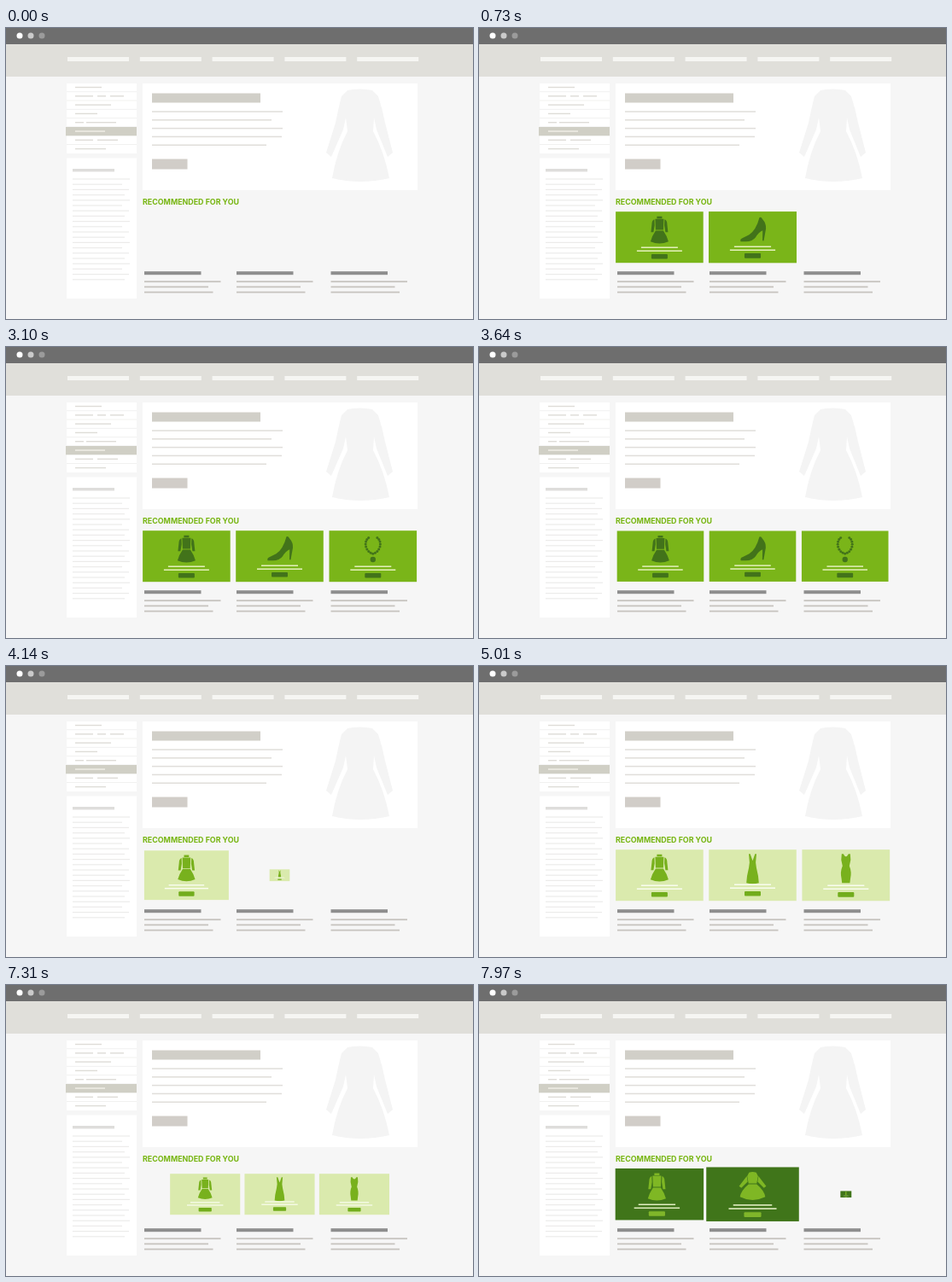
Animation, 547 px wide and 341 px high, one loop 8000 ms. Source, as an HTML page:

```html
<!DOCTYPE html>
<html lang="en">
<head>
<meta charset="utf-8">
<title>Recommendations</title>
<style>
  html, body { margin: 0; width: 100%; height: 100%; overflow: hidden; background: #f6f6f6; }
  svg { display: block; width: 100%; height: 100%; }
</style>
</head>
<body>
<svg id="stage" viewBox="0 0 547 341">
  <g id="page"></g>
  <text x="160" y="206.6" font-family="Inter, sans-serif" font-weight="700" font-size="8.9" fill="#76b510">RECOMMENDED FOR YOU</text>
  <g id="cards"></g>
</svg>
<script>
const LOOP = 8000;
const CENTERS = [211.4, 320.5, 429.8], MIDDLE_Y = 245.2;

const rect = (x, y, w, h, fill) => `<rect x="${x}" y="${y}" width="${w}" height="${h}" fill="${fill}"/>`;
const rule = (x1, x2, y, fill, h = 1.4) => rect(x1, y - h / 2, x2 - x1, h, fill);
const dot = (x, fill) => `<circle cx="${x}" cy="9" r="3.5" fill="${fill}"/>`;

function drawPage() {
  const out = [
    rect(0, 0, 547, 341, '#f6f6f6'), rect(0, 0, 547, 19, '#6e6e6e'), rect(0, 19, 547, 38, '#e0dfda'),
    dot(16, '#fff'), dot(29, '#cacaca'), dot(42, '#9b9b9b'),
    rect(71, 65, 82, 82, '#fff'), rect(71, 152.5, 82, 164.5, '#fff'), rect(160, 65, 322, 125, '#fff')
  ];
  for (let i = 0; i < 5; i++) out.push(rect(72 + i * 84.8, 34, 72, 5, '#f6f6f3'));

  // side menu
  const menu = [[[81, 112]], [[81, 102], [107, 117], [122, 138]], [[81, 123]], [[81, 107]],
    [[81, 91], [94, 129]], [[81, 116]], [[81, 102], [107, 131]], [[81, 117]]];
  menu.forEach((parts, i) => {
    const y = 69.5 + i * 10.3;
    if (i === 5) out.push(rect(70, 116, 83, 10.3, '#d0cfc5'));
    else if (i < 7) out.push(rule(71, 153, y + 5.2, '#f1f1f0', 1));
    parts.forEach(([a, b]) => out.push(rule(a, b, y, i === 5 ? '#f2f1ea' : '#dedcd7')));
  });

  // side text
  out.push(rect(78, 165, 49, 3.4, '#dedddb'));
  for (let i = 0; i < 20; i++) out.push(rule(78, [145, 136, 144, 139][i % 4], 177 + i * 6.2, '#ecebea', 1.2));

  // hero
  out.push(rect(171, 76.5, 127, 11, '#d1cfc8'), rect(171, 153.5, 41.5, 12, '#d1cdc8'));
  [324, 311, 324, 323, 305].forEach((end, i) => out.push(rule(171, end, 98 + i * 9.8, '#e0deda', 1.5)));
  out.push(`<path fill="#f4f4f4" d="M400 73Q414 70 429 73L436 80Q441 95 444 111L453 146L447 151L434 119L431 105L430 121
    Q443 145 449 176Q415 184 382 176Q387 146 400 121L398 105L395 119L381 151L375 146L386 111Q389 95 393 80Z"/>`);

  // captions below the cards
  [162, 270, 380.5].forEach(x => {
    out.push(rect(x, 285.2, 66.5, 4, '#8e8e8e'));
    [89.5, 75, 80.5].forEach((w, i) => out.push(rule(x, x + w, 297.2 + i * 6.2, '#c7c4bf', 1.8)));
  });
  return out.join('');
}

const beads = Array.from({ length: 17 }, (_, i) => {
  const a = (i / 16 - 0.5) * 5;
  const x = Math.sin(a) * 8.6, y = -13 + Math.cos(a) * 10 - Math.abs(x) * 0.15;
  return `<circle cx="${x.toFixed(1)}" cy="${y.toFixed(1)}" r="1.5"/>`;
}).join('');

const ICONS = {
  sleeves: `<path d="M-3-24.5H3V-22H-3ZM-5-21.5H5L4.5-8.6H-4.5ZM-4.5-7.6H4.5Q9-1 10.5 5Q0 9.5-10.5 5Q-9-1-4.5-7.6Z
    M-6-21Q-9-20-9-15L-10-6H-7L-5.7-14ZM6-21Q9-20 9-15L10-6H7L5.7-14Z"/>`,
  heel: `<path d="M8-23Q10-24 11.5-21Q16-16 15.5-10L13 4H11.5L11.7-8Q7-6 3.5 0Q0 5-8 5H-14Q-15 2-12 1L-4-3Q4-8 8-23Z"/>`,
  necklace: beads + '<circle cy="3.8" r="3.2"/>',
  gown: `<path d="M-4.5-25L-2.8-25L0-17L2.8-25L4.5-25L3.6-15L4.4-9Q7 1 7.3 9Q0 11-7.3 9Q-7 1-4.4-9L-3.6-15Z"/>`,
  sheath: `<path d="M-5-25H-3Q0-19 3-25H5L5.5-18L4-11Q7-4 5.2 4L4.6 9H-4.6L-5.2 4Q-7-4-4-11L-5.5-18Z"/>`,
  flared: `<path d="M-4-24Q0-25.5 4-24L6-20L4.5-12H-4.5L-6-20ZM-4.5-11H4.5Q13-4 14 3Q0 10-14 3Q-13-4-4.5-11Z
    M-6.5-20L-15-9L-12.5-7L-5.5-14ZM6.5-20L15-9L12.5-7L5.5-14Z"/>`
};

const THEMES = [
  { card: '#7ab519', icon: '#42731a', line: '#e6f2bd', button: '#42731a', icons: ['sleeves', 'heel', 'necklace'], shift: 0 },
  { card: '#daeaad', icon: '#78b11d', line: '#fafdf0', button: '#72ad1c', icons: ['sleeves', 'gown', 'sheath'], shift: 0 },
  { card: '#40751a', icon: '#7fb724', line: '#e2efc3', button: '#80b62a', icons: ['sleeves', 'flared', 'sheath'], shift: -3 }
];

const drawCard = (theme, i) => {
  const shift = i ? 0 : theme.shift, lift = i === 1 && theme.shift === 0 ? -1 : 0;
  return `<g>${rect(-51.3, -30, 102.6, 60, theme.card)}
    <g fill="${theme.icon}" transform="translate(${shift})">${ICONS[theme.icons[i]]}</g>
    <g transform="translate(${shift} ${lift})">
      ${rule(-21.5, 21.5, 12, theme.line, 1.5)}${rule(-26.5, 26.5, 16, theme.line, 1.5)}
      <rect x="-9.5" y="19.8" width="19" height="5.6" rx="1" fill="${theme.button}"/>
    </g></g>`;
};

document.getElementById('page').innerHTML = drawPage();
const cardLayer = document.getElementById('cards');
cardLayer.innerHTML = THEMES.map(theme => `<g>${[0, 1, 2].map(i => drawCard(theme, i)).join('')}</g>`).join('');
const groups = [...cardLayer.children];

// [time, value] keys joined by sine easing
function track(keys, t) {
  if (t <= keys[0][0]) return keys[0][1];
  for (let i = 1; i < keys.length; i++) {
    const [t0, a] = keys[i - 1], [t1, b] = keys[i];
    if (t < t1) return a + (b - a) * (1 - Math.cos(Math.PI * (t - t0) / (t1 - t0))) / 2;
  }
  return keys[keys.length - 1][1];
}

const POP_IN = [[0, 0], [240, 1.09], [370, 0.965], [480, 1.01], [600, 1]];
const SHRINK = [[-500, 1], [0, 1.075], [160, 0]];
const SCENES = [
  { starts: [70, 410, 750], peak: 3612 },
  { starts: [3772, 4068, 4440], peak: 7257 },
  { starts: [7455, 7687, 7918], peak: Infinity }
];

function place(node, x, y, scale) {
  node.setAttribute('visibility', scale > 0.005 ? 'inherit' : 'hidden');
  node.setAttribute('transform', `translate(${x} ${y}) scale(${Math.max(scale, 0.001)})`);
}

function render(t) {
  SCENES.forEach(({ starts, peak }, s) => {
    const visible = t >= starts[0] && t < peak + 160;
    groups[s].setAttribute('visibility', visible ? 'visible' : 'hidden');
    if (!visible) return;
    const zoom = track(SHRINK, t - peak);
    [...groups[s].children].forEach((card, i) => {
      const x = CENTERS[1] + (CENTERS[i] - CENTERS[1]) * zoom;
      place(card, x, MIDDLE_Y, zoom * track(POP_IN, t - starts[i]));
    });
  });
}

const begin = performance.now();
function tick() {
  render((performance.now() - begin) % LOOP);
  requestAnimationFrame(tick);
}
tick();
</script>
</body>
</html>
```
